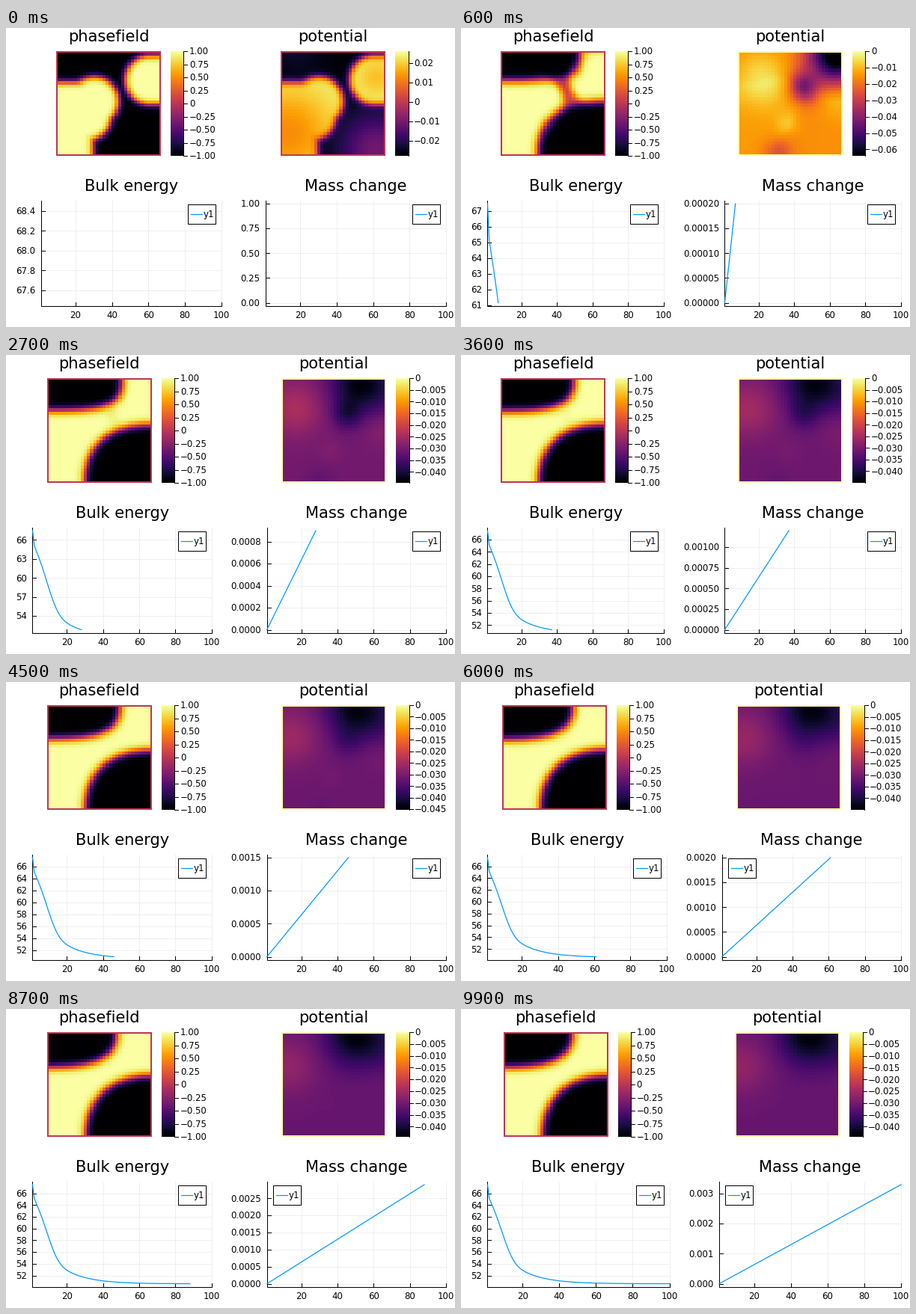
Recreate the animation shown at these times as a matplotlib script. Size 600 by 400 pixels, loop 10 s.

```python
import numpy as np
import matplotlib.pyplot as plt
from matplotlib.animation import FuncAnimation
from matplotlib.patches import Rectangle

FRAMES = 100
BOX = 140                  # heatmap side
CELL = BOX / 33
TOP, BOTTOM = 231, 371.5   # line plot area
EM, TITLE = 11.8, 21       # font sizes in pixels
BLUE = "#009afa"
PT = 0.72                  # points per pixel

plt.rcParams["font.family"] = "DejaVu Sans"
fig = plt.figure(figsize=(6, 4), dpi=100, facecolor="white")
ax = fig.add_axes([0, 0, 1, 1])

X, Y = np.meshgrid(np.arange(1, 33) * CELL, np.arange(1, 33) * CELL)


def gauss(x, y, s):
    return np.exp(-((X - x) ** 2 + (Y - y) ** 2) / (2 * s * s))


def relax(i, start, end, tau):
    return end + (start - end) * np.exp(-i / tau)


# ---- phase field ----

def super_dist(x, y, a, b, n):
    """First-order distance to a superellipse, positive outside."""
    u, v = np.abs(x) / a + 1e-6, np.abs(y) / b + 1e-6
    r = (u ** n + v ** n) ** (1 / n)
    slope = r ** (1 - n) * np.hypot(u ** (n - 1) / a, v ** (n - 1) / b)
    return (r - 1) / slope


def disc(x, y, r):
    return r - np.hypot(X - x, Y - y)


def smooth_max(a, b, k):
    h = np.clip(0.5 + (a - b) / (2 * k), 0, 1)
    return b + (a - b) * h + k * h * (1 - h)


def start_phase():
    slab = np.minimum(49.5 - X, Y - 41)
    blob = np.maximum(disc(51, 67, 33), disc(38, 84, 37))
    drop = 33 - np.hypot(np.minimum(X - 125, 0), Y - 38.5)
    return np.tanh(np.maximum(smooth_max(blob, slab, 4), drop) / 5)


PHASE0 = start_phase()
SLOWNESS = 2 + 6 * gauss(87, 51, 25)   # the neck closes last


def phase(i):
    upper = super_dist(X, Y, relax(i, 108, 90, 45), relax(i, 37.5, 47.5, 35),
                       relax(i, 5.2, 2.6, 20))
    lower = super_dist(BOX - X, BOX - Y, relax(i, 90.5, 88, 50),
                       relax(i, 72, 83, 40), relax(i, 2.5, 2.2, 25))
    phi = np.tanh(upper / 6) + np.tanh(lower / 6) - 1
    w = np.exp(-i / SLOWNESS)
    return np.clip(w * PHASE0 + (1 - w) * phi, -1, 1)


# ---- potential, as a fraction of its colour range ----

LO0, HI0 = -.0277, .0262


def start_potential():
    inside = .0245 - .012 * gauss(10, 110, 42) - .006 * gauss(128, 35, 18)
    outside = -.0268 + .016 * gauss(128, 132, 35) + .003 * gauss(20, 0, 25)
    mix = (1 + PHASE0) / 2
    return (mix * inside + (1 - mix) * outside - LO0) / (HI0 - LO0)


POT0 = start_potential()


def colour_range(i):
    late = (-.0443 - .0215 * np.exp(-((i - 6) / 3) ** 2)
            - .001 * np.exp(-((i - 48) / 20) ** 2))
    return relax(i, LO0, late, 2), HI0 * max(0, 1 - i / 2)


def potential(i):
    j = max(i, 6)
    fade = lambda tau: np.exp(-j / tau)
    field = (.285 + 1.5 * fade(5) + .05 * fade(40)
             + (.10 + .1 * fade(30)) * gauss(8 + 30 * fade(25), 47 - 13 * fade(40), 26)
             - .55 * fade(22) * gauss(88, 48, 14)
             - (.24 + 1.5 * fade(6)) * gauss(94 + 60 * fade(12), 6, 25)
             - .11 * gauss(135, 15, 25)
             - .25 * fade(14) * gauss(52, 138, 14)
             + .12 * fade(30) * gauss(134, 68, 17)
             + .12 * fade(20) * gauss(67, 97, 11))
    w = np.exp(-i / 2)
    return np.clip(w * POT0 + (1 - w) * field, 0, 1)


# ---- curves ----

STEP = np.arange(1, FRAMES + 1)
ENERGY = (50.6 + 10.1 * np.exp(-.075 * STEP)
          + 5.8 * np.exp(-(STEP / 11.7) ** 2.8)
          + 1.71 * np.exp(-4.0 * (STEP - 1)))
MASS = (STEP - 1) / 30000


# ---- ticks ----

NICE = [(1, .25), (5, .225), (2, .175), (2.5, .1225), (3, .05)]


def ticks_at(lo, hi, step):
    first, last = np.ceil(lo / step - 1e-6), np.floor(hi / step + 1e-6)
    return np.arange(first, last + 1) * step + 0.0


def count_score(n):
    """Five ticks are ideal, fewer than four are poor."""
    if n < 2:
        return -1
    if not 4 <= n < 10:
        return 0
    return .25 - .05 * abs(n - 5) + .01 * (n == 5)


def nice_ticks(lo, hi):
    z = int(np.floor(np.log10(hi - lo)))
    best = (-1, None, None)
    for e in (z, z - 1):
        for q, bonus in NICE:
            step = q * 10.0 ** e
            t = ticks_at(lo, hi, step)
            score = count_score(len(t)) + bonus
            if score > best[0] + 1e-9:
                best = (score, t, step)
    return best[1:]


def decimals(step):
    d = 0
    while abs(round(step, d) - step) > 1e-6 * step:
        d += 1
    return d


def tick_labels(ticks, step):
    """Labels and the widest label in ems."""
    if ticks[-1] - ticks[0] > 1.001e-4:
        d = decimals(step)
        labels = [f"{t:.{d}f}" for t in ticks]
        return labels, max(sum(.318 if c == "." else .636 for c in s) for s in labels)
    d = int(f"{step:.1e}"[2] != "0")
    labels = []
    for t in ticks:
        m, e = f"{t:.{d}e}".split("e")
        labels.append(rf"${m}\times10^{{{int(e)}}}$" if t else "0")
    return labels, 3.78 + .954 * d


def bar_step(span):
    n = np.floor(np.log10(span) + 1e-9)
    f = span / 10 ** n
    unit = 2 if f > 5 else 1 if f > 2.5 else .5 if f > 1 else .2
    return unit * 10 ** n / 2


# ---- drawing ----

def line(xs, ys, color="black", lw=1.0, **kw):
    ax.plot(xs, ys, color=color, lw=lw * PT, **kw)


def text(x, y, s, size=EM, ha="left", **kw):
    ax.text(x, y, s, fontsize=size * PT, ha=ha, va="baseline", **kw)


def heatmap(cx, title, field, border, lo, hi):
    x0, y0 = cx - BOX / 2, 31
    grid = np.pad(field, 1, constant_values=border)
    style = dict(cmap="inferno", vmin=0, vmax=1, aspect="auto",
                 interpolation="nearest")
    # the outer ring of cells is cut in half by the frame
    im = ax.imshow(grid, extent=(x0 - CELL / 2, x0 + BOX + CELL / 2,
                                 y0 + BOX + CELL / 2, y0 - CELL / 2), **style)
    im.set_clip_path(Rectangle((x0, y0), BOX, BOX, transform=ax.transData))
    text(cx, 18.5, title, TITLE, "center")

    bar, edge = x0 + BOX + 13, x0 + BOX + 30.5
    ax.imshow(np.linspace(1, 0, 256)[:, None],
              extent=(bar, edge, y0 + BOX, y0), **style)
    line([edge, edge], [y0, y0 + BOX])
    step = bar_step(hi - lo)
    d = decimals(step)
    for t in ticks_at(lo, hi, step):
        y = y0 + BOX * (hi - t) / (hi - lo)
        line([edge, edge + 5], [y, y])
        label = f"{t:.{d}f}".replace("-", "−") if t else "0"
        text(edge + 7.5, y + 4.3, label)


def limits(v):
    lo, hi = v.min(), v.max()
    if lo == hi:
        hi = lo + 1
    pad = .03 * (hi - lo)
    return lo - pad, hi + pad


def legend(x):
    ax.add_patch(Rectangle((x, 236), 37, 26, fc="white", ec="black",
                           lw=PT, zorder=3))
    line([x + 4, x + 19], [249, 249], BLUE, 1.2, zorder=4)
    text(x + 21, 253.3, "y1", zorder=4)


def line_plot(left, width, title, v, lims, ticks, labels, legend_left=False):
    lo, hi = lims
    right = left + width
    px = lambda s: left + (s - 1) / 99 * width
    py = lambda e: BOTTOM - (e - lo) / (hi - lo) * (BOTTOM - TOP)
    text(left + width / 2, 218.3, title, TITLE, "center")
    for s in range(20, 101, 20):
        line([px(s)] * 2, [TOP, BOTTOM], "#ececec", .8)
        line([px(s)] * 2, [BOTTOM - 5, BOTTOM], zorder=2.5)
        text(px(s), 388, str(s), ha="center")
    for t, label in zip(ticks, labels):
        line([left, right], [py(t)] * 2, "#ececec", .8)
        line([left, left + 5], [py(t)] * 2, zorder=2.5)
        text(left - 7.5, py(t) + 4.3, label, ha="right")
    line([left, left, right], [TOP, BOTTOM, BOTTOM], zorder=2.5)
    if len(v) > 1:
        line(px(STEP[:len(v)]), py(v), BLUE, 1.25, zorder=2.6)
    legend(left + 8 if legend_left else right - 45)


def draw(i):
    ax.cla()
    energy, mass = ENERGY[:i + 1], MASS[:i + 1]
    e_lims, m_lims = limits(energy), limits(mass)
    e_ticks, e_step = nice_ticks(*e_lims)
    m_ticks, m_step = nice_ticks(*m_lims)
    e_labels, e_em = tick_labels(e_ticks, e_step)
    m_labels, m_em = tick_labels(m_ticks, m_step)

    # both columns share the width left over by the tick labels
    left = 20.5 + 11.75 * e_em
    gap = 32.8 + 11.75 * m_em
    width = (588 - left - gap) / 2
    left2 = 588 - width

    centre = width / 2 - 30.3
    lo, hi = colour_range(i)
    heatmap(left + centre, "phasefield", (phase(i) + 1) / 2, .5, -1, 1)
    heatmap(left2 + centre, "potential", potential(i), -lo / (hi - lo), lo, hi)
    line_plot(left, width, "Bulk energy", energy, e_lims, e_ticks, e_labels)
    line_plot(left2, width, "Mass change", mass, m_lims, m_ticks, m_labels,
              legend_left=i >= FRAMES / 2)
    ax.set(xlim=(0, 600), ylim=(400, 0))
    ax.axis("off")
    return []


anim = FuncAnimation(fig, draw, frames=FRAMES, interval=100,
                     init_func=lambda: [], repeat=True, repeat_delay=0)
plt.show()
```
